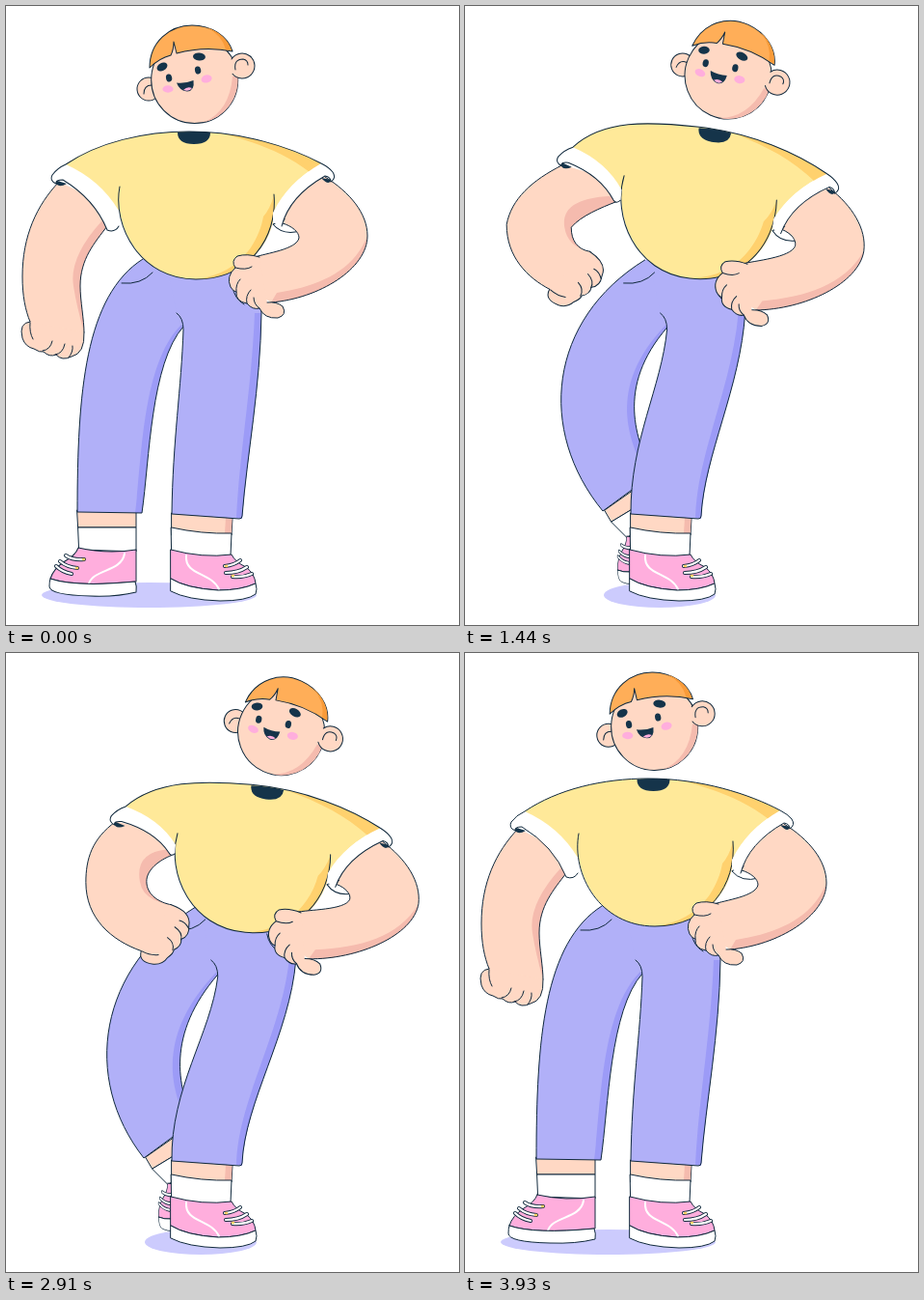
Animation, 470 px wide and 641 px high, one loop 3.96 s. Source, as an HTML page:

```html
<!DOCTYPE html>
<html lang="en">
<head>
<meta charset="utf-8">
<title>Strut</title>
<style>
html, body { margin: 0; width: 100%; height: 100%; overflow: hidden; background: #fff; }
svg { display: block; width: 100%; height: 100%; }
path, circle, ellipse { fill: none; stroke-linejoin: round; stroke-linecap: round; }
.ln { stroke: #10293d; stroke-width: 1; }
.ink, .ink * { fill: #15344a; }
.skin { fill: #ffd8c4; }
.skin2 { fill: #f5bbae; }
.top { fill: #ffe999; }
.top2 { fill: #ffd16e; }
.pants { fill: #b1b0f8; }
.pants2 { fill: #9c9bf7; }
.hair { fill: #ffae58; }
.hair2 { fill: #f99b39; }
.pink { fill: #ffaedd; }
.white { fill: #fff; }
.stripe { stroke: #fff; stroke-width: 2; }
.eyelet { stroke: #ffd166; stroke-width: 2.5; }
.laceEdge { stroke: #10293d; stroke-width: 4; }
.lace { stroke: #fff; stroke-width: 2.2; }
</style>
</head>
<body>
<svg viewBox="0 0 470 641">
  <ellipse id="shadow" cy="610" ry="13" style="fill:#cccbfd"/>

  <path id="ankle" class="skin ln"/>
  <path id="sock" class="white ln"/>
  <g id="backShoe">
    <path class="pink ln" d="M75 561Q105 568 135 563V596Q72 602 46 593Q49 583 61 575Q72 569 75 561Z"/>
    <path class="stripe" d="M123 567C120 586 91 583 86 598"/>
    <path class="white ln" d="M46 593Q72 602 134 596Q136 601 135 607Q115 612 88 611Q45 610 45 601Q45 596 46 593Z"/>
    <path class="laceEdge" d="M62 569Q69 574 81 573M56 575Q63 581 74 582M52 580Q58 586 68 588"/>
    <path class="lace" d="M62 569Q69 574 81 573M56 575Q63 581 74 582M52 580Q58 586 68 588"/>
    <path class="eyelet" d="M80 573h1M73 582h1"/>
  </g>
  <path id="backLeg" class="pants"/>
  <path id="backLegShade" class="pants2"/>
  <path id="backLegLine" class="ln"/>

  <path class="skin ln" d="M172 525L235 530L234 548H172Z"/>
  <path class="skin2" d="M228 530L234.500 531L234 546H227Z"/>
  <path class="white ln" d="M171.500 540Q203 547 234 546L233 569Q200 573 172 566Z"/>
  <path class="pink ln" d="M171 563Q204 572 234 568Q238 576 249 581Q258 588 259 598Q244 605 220 605Q187 603 171 593Z"/>
  <path class="stripe" d="M187 569C185 590 213 586 221 604"/>
  <path class="white ln" d="M171 593Q187 603 220 605Q244 605 259 598Q261 604 259 609Q250 616 222 616Q188 615 171 606Z"/>
  <path class="laceEdge" d="M227 580Q237 579 243 574M228 587Q241 587 250 581M235 591Q246 592 255 588"/>
  <path class="lace" d="M227 580Q237 579 243 574M228 587Q241 587 250 581M235 591Q246 592 255 588"/>
  <path class="eyelet" d="M228 580h1M235 590h1"/>
  <path id="leg" class="pants"/>
  <path id="legShade" class="pants2"/>
  <path id="legLine" class="ln"/>
  <path id="pockets" class="ln"/>

  <path id="armL" class="skin"/>
  <path id="armLShade" class="skin2"/>
  <path id="armLLine" class="ln"/>
  <g id="handL">
    <path class="skin ln" d="M25 327Q13 328 17 344Q20 353 29 355Q35 359 39 358Q45 364 52 361Q58 368 68 363Q82 360 81 338"/>
    <path class="ln" d="M25 328Q24 338 28 345M38 357Q46 356 48 347M51 361Q59 360 61 350M65 364Q70 358 69 352"/>
  </g>

  <g id="torso">
    <path class="white ln" d="M277 226Q287 238 305 233L287 222Z"/>
    <path id="shirt" class="top"/>
    <path class="top2" d="M228 133C270 138 302 150 330 165L315 172C290 153 262 142 228 133ZM278 196C284 235 255 283 197 283C240 278 262 247 267 218Q274 210 278 196Z"/>
    <path class="ln" d="M118 187C110 229 140 283 197 283C252 283 282 240 278 195"/>
    <path id="collar" class="ink" d="M178 131Q195 129 212 131Q212 143 195 143Q178 143 178 131Z"/>
  </g>

  <path id="armR" class="skin"/>
  <path id="armRShade" class="skin2"/>
  <path id="armRLine" class="ln"/>
  <g id="handR">
    <path class="skin ln" d="M263 260Q250 256 240 259Q233 264 238 271Q228 280 233 291Q236 296 239 296Q238 306 250 308Q256 315 263 313Q268 324 282 323Q292 320 287 311Q281 306 271 307"/>
    <path class="ln" d="M238 271Q249 274 255 270M239 296Q238 288 243 283M250 308Q248 300 254 294M263 313Q257 309 257 302"/>
  </g>

  <g id="sleeves">
    <path class="ink" d="M50 180Q53 190 63 184ZM327 178Q335 187 338 180ZM285 228Q284 221 290 220Z"/>
    <path id="cuffs" class="white"/>
    <path id="shirtLine" class="ln"/>
  </g>

  <g id="head">
    <circle class="skin ln" cx="148" cy="86" r="12"/>
    <path class="ln" d="M143 91Q143 82 151 82"/>
    <circle class="skin ln" cx="195.700" cy="76.500" r="45"/>
    <path class="skin2" d="M240.500 72A45 45 0 0 1 205 120.500Q232 109 235 73Z"/>
    <path class="hair ln" d="M149 64C149 37 170 20 193 20C213 20 230 31 235 47Q206 41 177 49L174 37Q174 45 171 51Q159 54 149 64Z"/>
    <path class="hair2" d="M208 22C221 26 231 35 234 46L228 45Q224 30 208 22Z"/>
    <circle class="skin" cx="245" cy="62" r="13"/>
    <path class="ln" d="M235 70.300A13 13 0 1 0 234 55M238 66Q236 55 246 55Q251 56 251 61"/>
    <g class="ink">
      <ellipse cx="162" cy="63" rx="5.800" ry="4" transform="rotate(-28 162 63)"/>
      <ellipse cx="200.500" cy="52.500" rx="6.500" ry="4" transform="rotate(5 200 52)"/>
      <ellipse class="eye" cx="169" cy="74.500" rx="3.100" transform="rotate(-12 169 74)"/>
      <ellipse class="eye" cx="199" cy="66.500" rx="3.100" transform="rotate(-12 199 66)"/>
      <path d="M177 79.500Q186 80.500 194.500 77Q196 88 188 88.500Q180 88 177 79.500Z"/>
    </g>
    <path class="pink" d="M184 87Q188 83 193 85Q191 88 187.500 87.800Z"/>
    <ellipse class="pink" cx="168" cy="86" rx="5.600" ry="3.700"/>
    <ellipse class="pink" cx="208" cy="75.500" rx="5.600" ry="4" transform="rotate(-15 208 75)"/>
  </g>
</svg>
<script>
const LOOP = 3960;
const times = [0, 360, 560, 1020, 1220, 1600, 1920, 2490, 3330, 3930, LOOP];
const tracks = {
  bodyX: [194, 220.5, 231, 235.5, 239, 243, 245.5, 250, 257, 194, 194],
  bodyY: [179.5, 189.5, 187, 178, 172, 180, 183.5, 185, 186.5, 179.5, 179.5],
  lean: [0, 3.7, 5, 7, 7, 5.6, 5.4, 5.1, 5, 0, 0],
  stretch: [1, 1, 1, 1.045, 1.045, 1.01, 1, 1, 1, 1, 1],
  headX: [196, 233, 250, 266, 271, 275, 277.5, 282, 288.5, 197, 196],
  headY: [76, 86.5, 84, 76, 67, 76, 80.5, 81, 81.5, 76, 76],
  tilt: [0, 8, 14, 21, 24, 24.5, 24.5, 24.5, 24.5, 1, 0],
  hip: [0, 11, 16, 21, 24, 26.5, 28, 32, 38, 0, 0],
  step: [0, 1, 2, 2, 2, 2, 2, 2, 2, 0, 0],
  akimbo: [0, 0, 0, 0, 0.3, 1, 1, 1, 1, 0, 0],
  leftX: [0, 20, 29, 35, 37, 37, 37, 37, 37, 0, 0],
  leftY: [0, -1, -10, -28, -36, -36, -36, -36, -36, 0, 0],
  rightX: [0, 13, 18, 25, 27, 28.5, 30, 35, 44, 0, 0],
  rightY: [0, 11, 10, 8.5, 4, 9, 9, 9, 8, 0, 0]
};

const $ = id => document.getElementById(id);
const draw = (id, d) => $(id).setAttribute('d', d);
const place = (id, transform) => $(id).setAttribute('transform', transform);
const mix = (a, b, k) => a + (b - a) * k;
const mixAll = (a, b, k) => a.map((v, i) => mix(v, b[i], k));
const shift = ([x, y], dx, dy = 0) => [x + dx, y + dy];

function turn([x, y], degrees, [fromX, fromY], [toX, toY]) {
  const a = degrees * Math.PI / 180, c = Math.cos(a), s = Math.sin(a);
  const dx = x - fromX, dy = y - fromY;
  return [toX + dx * c - dy * s, toY + dx * s + dy * c];
}

// Monotone cubic interpolation: smooth, without overshoot.
function sample(values, t) {
  let i = times.length - 2;
  while (i > 0 && times[i] > t) i--;
  const slope = j => (values[j + 1] - values[j]) / (times[j + 1] - times[j]);
  const tangent = j => {
    if (j === 0 || j === times.length - 1) return 0;
    const a = slope(j - 1), b = slope(j);
    return a * b > 0 ? 2 * a * b / (a + b) : 0;
  };
  const span = times[i + 1] - times[i], u = (t - times[i]) / span;
  const ease = u * u * (3 - 2 * u);
  return mix(values[i], values[i + 1], ease)
    + span * u * (1 - u) * ((1 - u) * tangent(i) - u * tangent(i + 1));
}

// Three stances of the stepping leg: apart, passing, crossed.
const stances = {
  waist: [[142, 262], [145, 263], [161, 263]],
  thigh: [[82, 300], [44, 320], [60, 325]],
  shin: [[74, 400], [57, 425], [67, 440]],
  hemL: [[74, 524], [128, 513], [143, 523]],
  hemR: [[141, 525], [180, 483], [195, 485]],
  calf: [[149, 470], [165, 450], [178, 450]],
  inner: [[150, 370], [104, 395], [130, 395]],
  crotch: [[184, 332], [183, 330], [184, 333]],
  ankleL: [[74, 522], [130, 512], [145, 522]],
  ankleR: [[135, 522], [185, 481], [195, 487]],
  sockL: [[75, 540], [135, 526], [152, 534]],
  sockR: [[135, 540], [186, 499], [200, 505]],
  heelL: [[76, 563], [148, 543], [168, 550]],
  heelR: [[135, 565], [196, 524], [210, 530]],
  shoe: [[1, 0, 0, 1, 75, 562], [0.62, -0.1, 0.185, 1, 148, 543], [0.55, -0.1, 0.2, 1, 168, 550]]
};

function drawLegs(p) {
  const first = p.step < 1 ? 0 : 1, q = {};
  for (const name in stances) {
    q[name] = mixAll(stances[name][first], stances[name][first + 1], p.step - first);
  }
  for (const name of ['waist', 'thigh', 'inner', 'crotch']) q[name] = shift(q[name], p.hip);
  q.shin = shift(q.shin, p.hip * 0.3);

  draw('ankle', `M${q.ankleL}L${q.ankleR} ${q.sockR} ${q.sockL}Z`);
  draw('sock', `M${q.sockL}L${q.sockR} ${q.heelR} ${q.heelL}Z`);
  place('backShoe', `matrix(${q.shoe}) translate(-75 -562)`);

  const backEdges = `M${q.waist}C${q.thigh} ${q.shin} ${q.hemL}L${q.hemR}C${q.calf} ${q.inner} ${q.crotch}`;
  draw('backLeg', `${backEdges}L${230 + p.hip},330 ${230 + p.hip},262Z`);
  draw('backLegLine', backEdges);
  draw('backLegShade', `M${q.hemR}C${q.calf} ${q.inner} ${q.crotch}L${shift(q.crotch, -2, -2)}`
    + `C${shift(q.inner, -9)} ${shift(q.calf, -8)} ${shift(q.hemR, -7)}Z`);

  const x = n => n + p.hip, knee = p.hip * 0.85, calf = -p.hip * 0.06;
  const innerLine = `M${x(177)} 318Q${x(184)} 323 ${x(184)} 335C${182 + knee} 395 ${173 + calf} 450 172 526`;
  const thigh = `${264 + knee} 395 ${x(265)} 318`, shin = `${250 + calf} 465`;
  draw('leg', `${innerLine}L245 531C${shin} ${thigh}L${x(256)} 262L${x(165)} 262Z`);
  draw('legShade', `M245 531C${shin} ${thigh}H${x(258)}C${255 + knee} 395 ${242 + calf} 465 239 530Z`);
  draw('legLine', `${innerLine}L242 531Q245 531 245 528C${shin} ${thigh}L${x(262)} 280`);
  const px = q.waist[0] - 142;
  draw('pockets', `M${120 + px} 287Q${140 + px} 289 ${152 + px} 276M${x(235)} 291q2 12 12 18`);

  const left = p.step < 1 ? mix(37, 132, p.step) : mix(132, 144, p.step - 1);
  $('shadow').setAttribute('cx', (left + 260) / 2);
  $('shadow').setAttribute('rx', (260 - left) / 2);
}

function drawArms(p) {
  const onBody = pt => turn(pt, p.lean, [194, 179.5], [p.bodyX, p.bodyY]);
  const swing = Math.sin(Math.PI * p.akimbo);

  // Each point: hanging place, hand-on-hip place, pull of the hand.
  const left = (hang, hips, pull) => {
    const loose = mixAll(onBody(hang), shift(hang, p.leftX, p.leftY), pull);
    const fixed = shift(hips, p.bodyX - 245.5, p.bodyY - 183.5);
    return shift(mixAll(loose, fixed, p.akimbo), -40 * swing * pull, -8 * swing * pull);
  };
  const pivot = [50, 338], wrist = left(pivot, [151, 287], 1), angle = -68 * p.akimbo;
  const outWrist = turn([25, 327], angle, pivot, wrist);
  const inWrist = turn([81, 338], angle, pivot, wrist);
  const elbow = left([17, 280], [74, 235], 1), bend = left([77, 290], [137, 234], 0.8);
  const armpit = left([105, 228], [163, 207], 0);
  const outerL = `M${left([55, 182], [105, 172], 0)}C${left([32, 206], [80, 190], 0.3)} `
    + `${left([17, 238], [74, 211], 0.8)} ${elbow}C${left([17, 300], [74, 272], 1)} `
    + `${left([20, 315], [100, 295], 1)} ${outWrist}`;
  const innerL = `C${left([81, 325], [150, 256], 1)} ${left([77, 305], [137, 248], 0.8)} ${bend}`
    + `C${left([77, 262], [137, 222], 0.4)} ${left([92, 245], [150, 212], 0.1)} ${armpit}`;
  draw('armL', `${outerL}L${wrist} ${inWrist}${innerL}L${left([91, 199], [141, 180], 0)}Z`);
  draw('armLLine', `${outerL}M${inWrist}${innerL}`);
  draw('armLShade', `M${inWrist}${innerL}L${shift(armpit, -5, -6)}`
    + `Q${shift(bend, -12, -30)} ${shift(bend, -7)}Q${shift(bend, -4, 20)} ${inWrist}Z`);
  place('handL', `translate(${wrist}) rotate(${angle}) translate(-50 -338)`);

  const grip = 5 * p.akimbo, base = [262, 290], palm = shift(base, p.rightX, p.rightY);
  const right = (x, y, pull) => mixAll(onBody([x, y]), turn([x, y], grip, base, palm), pull);
  const tip = right(375, 238, 0.15), heel = right(275, 307, 1);
  const lower = `C${right(375, 272, 0.4)} ${right(325, 303, 0.9)} ${heel}`;
  const outerR = `M${right(331, 177, 0)}C${right(357, 193, 0)} ${right(375, 215, 0.1)} ${tip}${lower}`;
  const innerR = `C${right(270, 256, 1)} ${right(302, 252, 0.4)} ${right(304, 240, 0.2)}`
    + `C${right(304, 234, 0.1)} ${right(297, 228, 0)} ${right(287, 225, 0)}`;
  const thumb = right(258, 260, 1);
  draw('armR', `${outerR}L${right(252, 292, 1)} ${thumb}${innerR}L${right(298, 191, 0)}Z`);
  draw('armRLine', `${outerR}M${thumb}${innerR}`);
  draw('armRShade', `M${tip}${lower}L${right(281, 297, 1)}C${right(325, 290, 0.8)} ${right(360, 275, 0.4)} ${tip}Z`);
  place('handR', `translate(${palm}) rotate(${grip}) translate(-262 -290)`);
}

function drawShirt(p) {
  const rise = 22 * p.akimbo;
  const dome = `C${96 - p.lean} ${141 - p.lean * 1.3} ${143 - p.lean} 130 190 130C245 130 295 146 327 163`;
  const seamL = `Q98 ${180 - rise * 0.3} 117 ${212 - rise * 0.6}`;
  const foldL = `${117} ${228 - rise * 0.9}`;
  const hemL = `Q113 ${235 - rise * 1.05} ${105 + rise * 0.27} ${232 - rise * 1.09}`
    + `Q${92 + rise * 0.1} ${200 - rise * 0.6} 59 180Q51 180 52 184Q45 181 48 175Q53 168 62 164`;
  const hemR = 'Q335 167 339 172Q343 178 337 182Q337 177 331 176Q294 197 286 228';

  draw('shirt', `M62 164${dome}Q292 183 278 214C277 245 248 283 197 283C140 283 116 230 117 200L117 ${212 - rise * 0.6}L62 164Z`);
  draw('cuffs', `M62 164${seamL}L${foldL}${hemL}ZM327 163${hemR}Q281 229 277 222V214Q292 183 327 163Z`);
  draw('shirtLine', `M${foldL}${hemL}${dome}${hemR}`);

  const body = `translate(${p.bodyX} ${p.bodyY}) rotate(${p.lean}) scale(1 ${p.stretch}) translate(-194 -179.5)`;
  place('torso', body);
  place('sleeves', body);
  place('collar', `translate(${p.tilt * 0.48} ${p.tilt * 0.03}) rotate(${p.tilt * 0.12} 195 131)`);
}

function render(t) {
  const p = {};
  for (const name in tracks) p[name] = sample(tracks[name], t);

  drawLegs(p);
  drawArms(p);
  drawShirt(p);
  place('head', `translate(${p.headX} ${p.headY}) rotate(${p.tilt}) translate(-196 -76)`);

  const blink = Math.max(0, 1 - Math.abs(t - 360) / 120);
  for (const eye of document.querySelectorAll('.eye')) eye.setAttribute('ry', mix(4, 1.4, blink));
}

const start = performance.now();
function tick() {
  render((performance.now() - start) % LOOP);
  requestAnimationFrame(tick);
}
tick();
</script>
</body>
</html>
```
